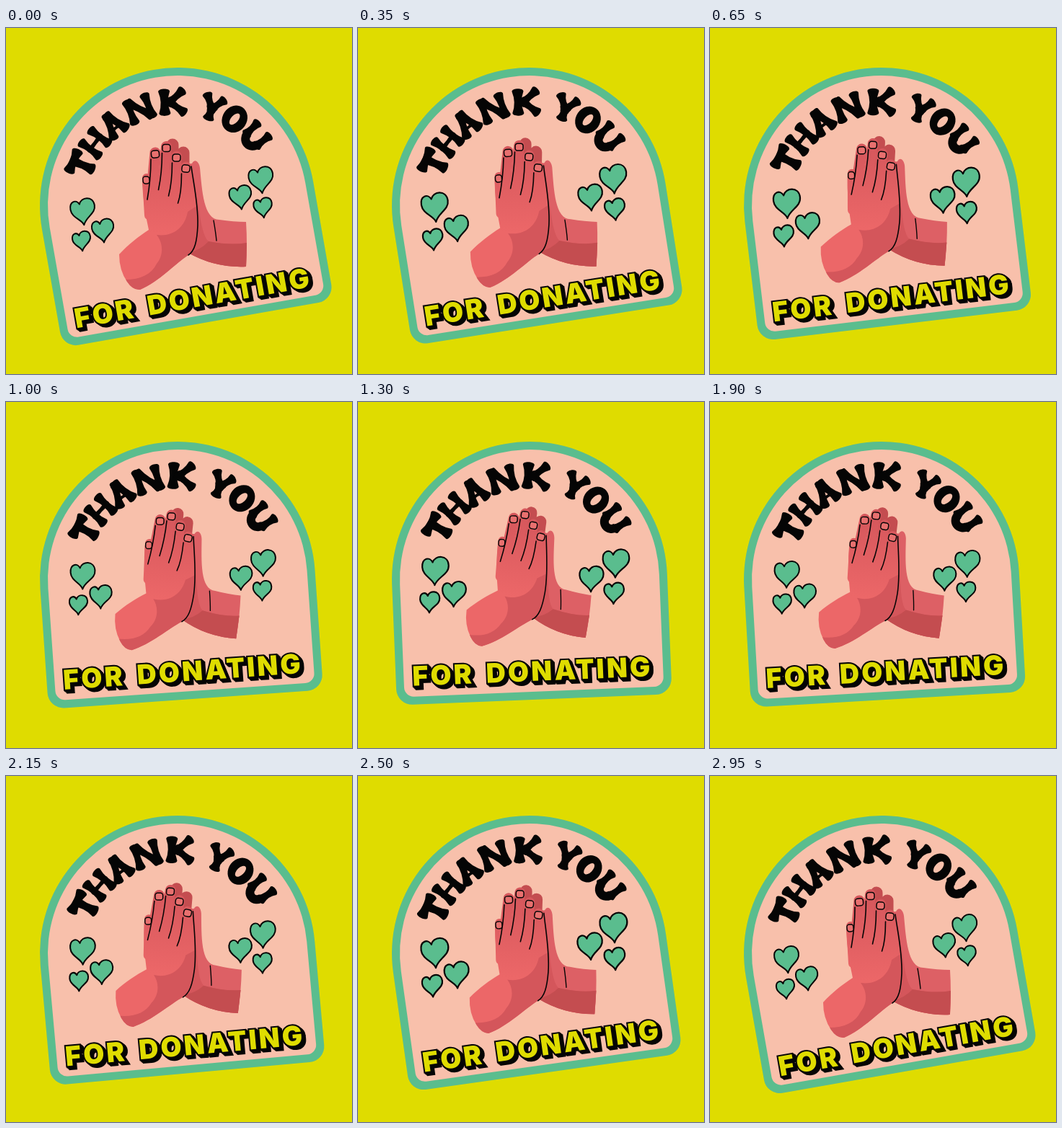
An HTML page with a canvas that plays this animation: 480x480 px, repeating every 3 s.

```html
<!DOCTYPE html>
<html lang="en">
<head>
<meta charset="utf-8">
<title>Thank you for donating</title>
<style>
html, body { margin: 0; width: 100%; height: 100%; overflow: hidden; background: #dfdc00; }
canvas { display: block; width: 480px; height: 480px; }
</style>
</head>
<body>
<canvas id="c" width="480" height="480"></canvas>
<script>
const ctx = document.getElementById('c').getContext('2d');
const LOOP = 3000, STEP = 50, CX = 238, CY = 246, TAU = Math.PI * 2;
const rad = d => d * Math.PI / 180;
const C = {
  bg: '#dfdc00', green: '#5abd8e', pink: '#f8c0ab', ink: '#050505',
  light: '#ec6768', mid: '#dd6065', dark: '#d4565b', deep: '#c44d50'
};

function layer(draw) { ctx.save(); draw(); ctx.restore(); }
function shape(d, color) { ctx.fillStyle = color; ctx.fill(new Path2D(d)); }
function line(d, w = 1.6, color = C.ink) {
  ctx.strokeStyle = color;
  ctx.lineWidth = w;
  ctx.lineCap = ctx.lineJoin = 'round';
  ctx.stroke(new Path2D(d));
}

// Arched badge: half circle on top, rounded corners below
function arch(inset, color) {
  const r = 191 - inset, bottom = 167 - inset, corner = 22 - inset * .8;
  ctx.beginPath();
  ctx.arc(0, 0, r, Math.PI, 0);
  ctx.arcTo(r, bottom, 0, bottom, corner);
  ctx.arcTo(-r, bottom, -r, 0, corner);
  ctx.closePath();
  ctx.fillStyle = color;
  ctx.fill();
}

// Letter stroke with bell ends and a narrow waist, on a grid from -1 to 1
function bell(x1, y1, x2, y2, w = 8) {
  const dx = (x2 - x1) * 12, dy = (y2 - y1) * 15, len = Math.hypot(dx, dy), waist = w * .28;
  layer(() => {
    ctx.translate(x1 * 12, y1 * 15);
    ctx.rotate(Math.atan2(dy, dx));
    ctx.beginPath();
    ctx.moveTo(0, -w);
    ctx.quadraticCurveTo(len / 2, -waist, len, -w);
    ctx.bezierCurveTo(len + 5, -w, len + 5, w, len, w);
    ctx.quadraticCurveTo(len / 2, waist, 0, w);
    ctx.bezierCurveTo(-5, w, -5, -w, 0, -w);
    ctx.fill();
  });
}

function bowl() {
  ctx.beginPath();
  ctx.ellipse(0, 4, 10, 10.5, 0, 0, Math.PI);
  ctx.lineWidth = 12;
  ctx.strokeStyle = C.ink;
  ctx.stroke();
}
function ring() {
  ctx.beginPath();
  ctx.ellipse(0, 0, 17, 19.5, 0, 0, TAU);
  ctx.ellipse(0, 0, 5, 9.5, .15, 0, TAU);
  ctx.fill('evenodd');
}

// arc: degrees taken on the circle
const glyphs = {
  T: { arc: 14, bars: [[-1.2, -.9, 1.2, -.9], [0, -1, 0, 1]] },
  H: { arc: 14, bars: [[-.9, -1, -.9, 1, 7], [.9, -1, .9, 1, 7], [-1, 0, 1, 0, 4]] },
  A: { arc: 15, bars: [[0, -1, -.9, 1, 7], [0, -1, .9, 1, 7.5], [-.5, .4, .5, .4, 3]] },
  N: { arc: 19, bars: [[-1.1, -1, -1.1, 1, 7], [1.1, -1, 1.1, 1, 7], [-1, -.9, 1, .9, 7]] },
  K: { arc: 19, bars: [[-1, -1, -1, 1], [-.5, .1, 1.1, -1, 7], [-.5, -.1, 1.2, 1, 7]] },
  ' ': { arc: 6, bars: [] },
  Y: { arc: 13, bars: [[0, .1, -1, -1, 7], [0, .1, 1, -1, 7], [0, 0, 0, 1]] },
  O: { arc: 15, bars: [], round: ring },
  U: { arc: 15, bars: [[-1, -1, -.9, .4, 7], [1, -1, .9, .4, 7]], round: bowl }
};

function drawTitle(u) {
  ctx.rotate(rad(-64 - 1.3 * u));
  ctx.fillStyle = C.ink;
  for (const ch of 'THANK YOU') {
    const { arc, bars, round } = glyphs[ch];
    ctx.rotate(rad(arc / 2));
    layer(() => {
      ctx.translate(0, -143.5);
      bars.forEach(b => bell(...b));
      round?.();
    });
    ctx.rotate(rad(arc / 2));
  }
}

function drawCaption(u) {
  ctx.translate(0, 143.5 - 2.5 * u);
  ctx.font = '900 37.5px Inter, "Open Sans", sans-serif';
  ctx.letterSpacing = '3.2px';
  ctx.lineWidth = 4;
  ctx.miterLimit = 3;
  ctx.strokeStyle = C.ink;
  const write = (put, dx, dy) => {
    put.call(ctx, 'FOR', dx - 168, dy);
    put.call(ctx, 'DONATING', dx - 65.5, dy);
  };
  for (let i = 4; i >= 0; i--) write(ctx.strokeText, i, i);
  ctx.fillStyle = C.bg;
  write(ctx.fillText, 0, 0);
}

const heart = new Path2D('M-.12 1.15C-.2.68-1 .42-1-.25C-1-.95-.4-1.05-.2-.58C0-1.15 1-1.12 1-.3C1 .4.15.5-.12 1.15Z');
// Each cluster swells around its small heart: [x, y, radius]
const clusters = [
  [[-139.3, 25, 12.6], [-107.5, 15.6, 15.2], [-130.4, -15.2, 17]],
  [[116.5, 23, 12.8], [88.4, 3.2, 15.4], [120.7, -15.6, 17]]
];

function drawHearts(swell) {
  for (const list of clusters) layer(() => {
    const [px, py] = list[0];
    ctx.translate(px, py);
    ctx.scale(swell, swell);
    for (const [x, y, r] of list) layer(() => {
      ctx.translate(x - px, y - py);
      ctx.scale(r, r);
      ctx.fillStyle = C.green;
      ctx.fill(heart);
      ctx.strokeStyle = C.ink;
      ctx.lineJoin = 'round';
      ctx.lineWidth = 2 / r;
      ctx.stroke(heart);
    });
  });
}

function nail(x, y, deg, w = 11) {
  layer(() => {
    ctx.translate(x, y);
    ctx.rotate(rad(deg));
    ctx.beginPath();
    ctx.roundRect(-w / 2, -5, w, 10, 3.4);
    ctx.fillStyle = '#e8706f';
    ctx.fill();
    ctx.strokeStyle = C.ink;
    ctx.lineWidth = 1.5;
    ctx.stroke();
  });
}

const palm = 'M189 212L243 191L257 192C260 215 267 245 266 274C265 296 262 309 253 315C236 326 212 352 186 363Q176 364 168 352Q157 336 157 314C170 300 184 289 198 280Q190 245 189 212Z';
const tips = [[207, 173], [222.5, 164.5], [236.5, 178], [249.5, 193]];

function drawFarHand() {
  line('M231 162V240M246 173V240', 17, C.deep);
  shape('M240 190L258 188C262 180 268 186 269 194C272 225 274 266 296 266Q316 269 333 269Q335 300 333 331Q290 333 253 312Z', C.mid);
  shape('M257 190C266 225 268 285 281 296Q312 302 334 298L333 331Q290 333 253 312Z', C.dark);
  shape('M281 296Q312 302 334 298L333 331Q290 333 253 312Q270 308 281 296Z', C.deep);
  line('M288 267Q291 284 292 295', 1.4);
}

function drawNearHand() {
  const skin = ctx.createLinearGradient(0, 160, 0, 285);
  skin.addColorStop(0, C.dark);
  skin.addColorStop(1, C.light);
  shape(palm, skin);
  line('M195 208L198 260', 12, skin);
  for (const [x, y] of tips) line(`M${x} ${y}l-7 75`, 15, skin);
  layer(() => {
    ctx.clip(new Path2D(palm));
    shape('M150 348C180 352 200 345 209 327C219 315 218 298 209 287C230 290 248 278 252 255L275 240V320L185 375Z', C.dark);
  });
  line('M257 192C260 215 267 245 266 274C265 296 262 309 253 315');
  tips.forEach(([x, y], i) => {
    line(`M${x - 6} ${y + 9}q0 27 -5 ${56 - i * 5}`);
    nail(x, y + 2, i * 4 - 5);
  });
  nail(194.5, 211, -5, 9);
}

// Hands are laid out in the pose of the loop's start
function drawHands(u) {
  const s = 1 - .043 * u;
  ctx.translate(-1.3 * u, -12.4 * u);
  ctx.scale(s, s);
  ctx.rotate(rad(10));
  ctx.translate(-CX, -CY);
  drawFarHand();
  drawNearHand();
}

function draw(t) {
  const swing = Math.cos(TAU * t / LOOP);
  const u = (1 - swing) / 2;
  const swell = 1.06 - .06 * Math.cos(TAU * t / 1000);
  ctx.fillStyle = C.bg;
  ctx.fillRect(0, 0, 480, 480);
  layer(() => {
    ctx.translate(CX, CY);
    ctx.rotate(rad(-6 - 4 * swing));
    arch(0, C.green);
    arch(11, C.pink);
    layer(() => drawTitle(u));
    drawHearts(swell);
    layer(() => drawHands(u));
    layer(() => drawCaption(u));
  });
}

let start;
function tick(now) {
  start ??= now;
  draw(Math.floor((now - start) / STEP) * STEP % LOOP);
  requestAnimationFrame(tick);
}
draw(0);
requestAnimationFrame(tick);
</script>
</body>
</html>
```
